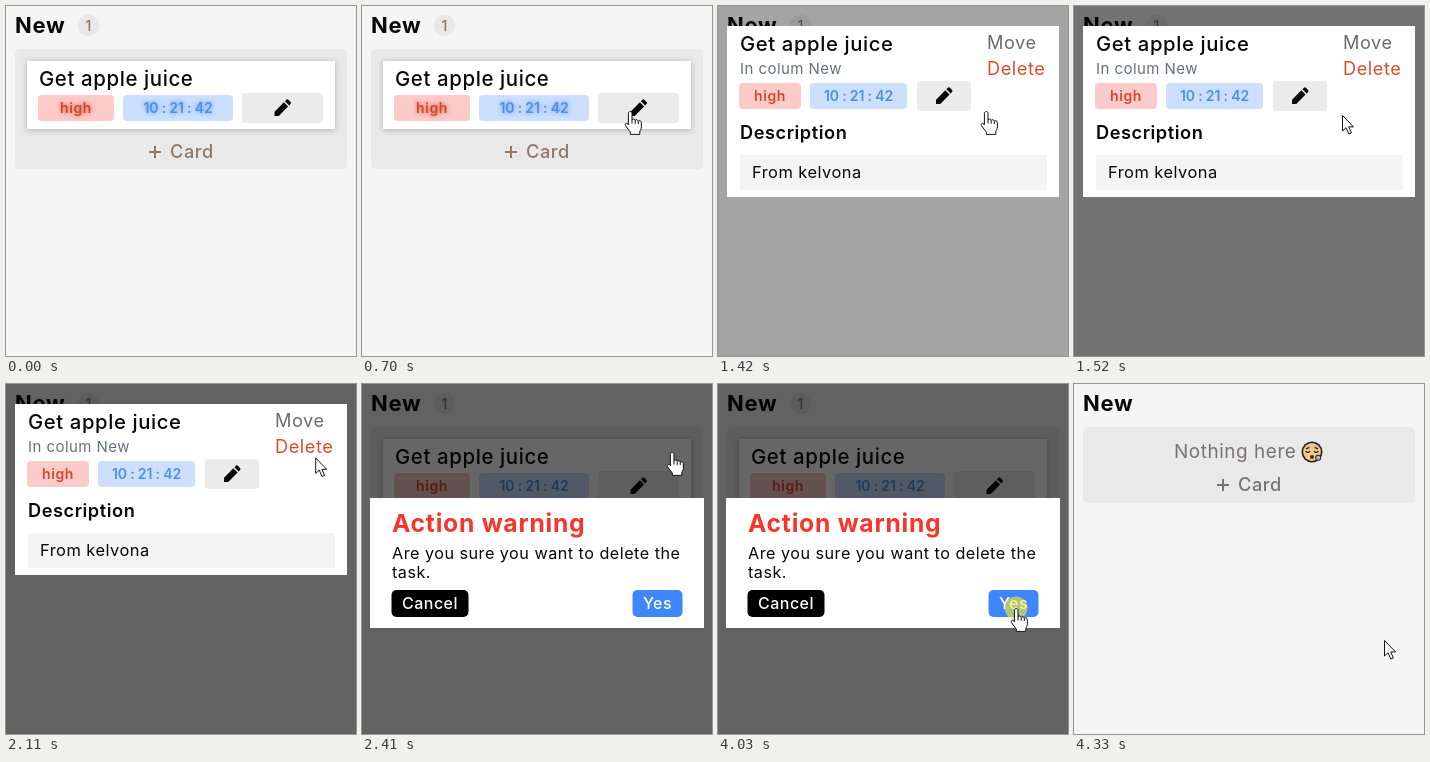
Recreate the animation shown at these times as an HTML page with a canvas. Size 350x350 px, loop 4.43 s.

```html
<!DOCTYPE html>
<html lang="en">
<head>
<meta charset="utf-8">
<title>Task board</title>
<style>
html, body { margin: 0; width: 100%; height: 100%; overflow: hidden; background: #f5f5f5; }
canvas { display: block; width: 350px; height: 350px; }
</style>
</head>
<body>
<canvas id="stage"></canvas>
<script>
const LOOP = 4430;
const OPEN = 1320, ASK = 2410, CONFIRM = 4030, REMOVED = 4130;
const INK = '#080808';
const canvas = document.getElementById('stage');
const ratio = window.devicePixelRatio || 1;
canvas.width = canvas.height = Math.round(350 * ratio);
const ctx = canvas.getContext('2d');

const PENCIL = new Path2D('M3 16.2V21H7.8L18.4 10.4 13.6 5.6z' +
  'M14.8 4.4l1.6-1.6a1.6 1.6 0 0 1 2.3 0l2.5 2.5a1.6 1.6 0 0 1 0 2.3l-1.6 1.6z');
const ARROW = new Path2D('M.5 .5V16L4 12.7 6.8 19 9.4 18 6.7 11.9H11.5Z');
const HAND = new Path2D('M-1.6 13V2.2C-1.6 0 2 0 2 2.2V9C2.2 7.5 5 7.6 5.2 9.4' +
  'C5.6 8.2 8 8.4 8.3 10.3C8.9 9.3 11.4 9.6 11.4 11.6V16C11.4 18.2 9.8 19.4 9.8 21V23.4' +
  'H.4V21.2C-1 19.2-3 17-4.5 14.6C-5.4 12.6-3.4 11.4-2.3 12.8L-1.6 13.8Z');

// Each move ends on a spot and shows a hand there until its release time.
const ENTRY = { x: 246, y: 282 };
const MOVES = [
  { from: 200, steps: 6, x: 268, y: 105, release: 1520 },
  { from: 1620, steps: 3, x: 305, y: 77, release: 2610 },
  { from: 1910, steps: 4, x: 310, y: 68, release: 2610 },
  { from: 2610, steps: 7, x: 298, y: 224, release: REMOVED },
  { from: REMOVED, steps: 3, x: 310, y: 252, release: 0 }
];

const smooth = u => u * u * (3 - 2 * u);
const easeOut = u => 1 - (1 - u) ** 2;

// Progress from 0 to 1 that advances once every 100 ms.
function stepped(t, from, steps) {
  return Math.min(Math.max(Math.floor((t - from) / 100) + 1, 0), steps) / steps;
}

function box(x, y, w, h, color, r = 0) {
  ctx.fillStyle = color;
  ctx.beginPath();
  ctx.roundRect(x, y, w, h, r);
  ctx.fill();
}

function disc(x, y, r, color) {
  ctx.fillStyle = color;
  ctx.beginPath();
  ctx.arc(x, y, r, 0, 7);
  ctx.fill();
}

function text(str, x, y, size, weight, color, align = 'left', gap = .03) {
  ctx.font = `${weight} ${size}px Inter, "Open Sans", sans-serif`;
  ctx.letterSpacing = `${size * gap}px`;
  ctx.textAlign = align;
  ctx.fillStyle = color;
  ctx.fillText(str, x, y);
}

function shadow(color, blur, y, draw) {
  ctx.save();
  ctx.shadowColor = color;
  ctx.shadowBlur = blur * ratio;
  ctx.shadowOffsetY = y * ratio;
  draw();
  ctx.restore();
}

function chip(label, x, y, w, fill, color, glow, gap) {
  box(x, y, w, 26, fill, 4);
  shadow(color, glow, 0, () => text(label, x + w / 2, y + 18, 14, 600, color, 'center', gap));
}

function tags(x, y, highW, timeW, editW, space, glow) {
  chip('high', x, y, highW, '#fdcaca', '#cf4a2c', glow, .04);
  chip('10 : 21 : 42', x + highW + 9, y, timeW, '#cddfff', '#4c90e4', glow, -.01);
  const left = x + highW + timeW + 9 + space;
  box(left, y - 2, editW, 30, '#ebebeb', 4);
  ctx.save();
  ctx.translate(left + editW / 2 - 10.6, y + 2.4);
  ctx.scale(.88, .88);
  ctx.fillStyle = INK;
  ctx.fill(PENCIL);
  ctx.restore();
}

function addCard(y, color) {
  box(143, y - 1, 12, 2, color);
  box(148, y - 6, 2, 12, color);
  text('Card', 164, y + 6, 18.2, 500, color);
}

function sleepyFace(x, y) {
  ctx.save();
  ctx.translate(x, y);
  disc(0, 0, 10.5, '#25221e');
  disc(0, 0, 8.9, '#efc98a');
  ctx.strokeStyle = '#2b241d';
  ctx.lineWidth = 1.3;
  for (const side of [-1, 1]) {
    ctx.save();
    ctx.scale(side, 1);
    ctx.stroke(new Path2D('M2.6-4.6L6-3.2M2-.8Q4.2 1.4 6.4-.8'));
    ctx.restore();
  }
  disc(0, 5, 2, '#3a2c22');
  disc(6.2, 5.8, 3, '#2b241d');
  disc(6.2, 5.8, 2, '#a9c3d2');
  ctx.restore();
}

function board(empty, glow) {
  box(0, 0, 350, 350, '#f5f5f5');
  text('New', 9, 27, 22, 700, INK);
  box(9, 43, 332, empty ? 76 : 120, '#e9e9e9', 5);
  if (empty) {
    text('Nothing here', 100, 74, 18.9, 400, '#77736e');
    sleepyFace(238, 68);
    addCard(101, '#777371');
    return;
  }
  disc(82.5, 19.5, 10.7, '#e8e8e8');
  text('1', 82.5, 24.5, 14, 500, '#8f7061', 'center');
  shadow('rgba(0,0,0,.25)', 6, 1, () => box(21, 55, 308, 68, '#fff'));
  text('Get apple juice', 33, 80, 20.4, 500, INK);
  tags(32, 89, 76, 110, 81, 9, glow);
  addCard(146, '#927667');
}

function taskModal() {
  box(9, 20, 332, 171, '#fff');
  text('Get apple juice', 22, 45, 20.3, 550, INK);
  text('Move', 269, 43, 18.2, 400, '#676a70');
  text('Delete', 269, 69, 18.2, 400, '#d6502e');
  text('In colum New', 22, 68, 15, 400, '#66707a');
  tags(21, 77, 62, 97, 54, 10, 0);
  text('Description', 22, 133, 18.2, 600, INK);
  box(22, 149, 307, 35, '#f4f4f4');
  text('From kelvona', 34, 172, 16.4, 400, INK);
}

function button(label, x, w, color) {
  box(x, 206, w, 27, color, 5);
  text(label, x + w / 2, 225, 16, 500, '#fff', 'center');
}

function warning() {
  box(8, 114, 334, 130, '#fff');
  text('Action warning', 30, 147.5, 24.7, 700, '#f8352b');
  ['Are you sure you want to delete the', 'task.'].forEach((line, i) =>
    text(line, 30, 175 + i * 19, 16.2, 400, INK));
  button('Cancel', 29.5, 77, '#000');
  button('Yes', 270.5, 50, '#3d87fb');
}

function cursorAt(t) {
  let { x, y } = ENTRY, hand = false;
  for (const move of MOVES.filter(m => m.from <= t)) {
    const u = smooth(stepped(t, move.from, move.steps));
    x += (move.x - x) * u;
    y += (move.y - y) * u;
    hand = u > .9 && t < move.release;
  }
  return { x, y, hand };
}

function pointer(t, time) {
  const { x, y, hand } = cursorAt(t);
  const pressed = [OPEN, CONFIRM].some(at => time >= at && time < at + 100);
  if (pressed) disc(x, y, 11.5, 'rgba(250,236,50,.6)');
  ctx.save();
  ctx.translate(x, hand ? y : y + 4);
  ctx.lineJoin = 'round';
  ctx.fillStyle = '#fff';
  ctx.strokeStyle = '#111';
  const shape = hand ? HAND : ARROW;
  ctx.fill(shape);
  ctx.stroke(shape);
  if (hand) ctx.stroke(new Path2D('M2 9V12.5M5.2 9.4V12.8M8.3 10.3V13'));
  ctx.restore();
}

function draw(now) {
  const t = now % LOOP;
  const shade = .6 * (easeOut(stepped(t, OPEN + 100, 3)) - easeOut(stepped(t, REMOVED, 3)));
  ctx.setTransform(ratio, 0, 0, ratio, 0, 0);
  board(t >= REMOVED, t < OPEN ? 5 : 0);
  box(0, 0, 350, 350, `rgba(0,0,0,${shade})`);
  if (t >= OPEN && t < ASK) taskModal();
  if (t >= ASK && t < REMOVED) warning();
  if (t >= MOVES[0].from) pointer(t, t);
}

const start = performance.now();
function tick() {
  draw(performance.now() - start);
  requestAnimationFrame(tick);
}
tick();
</script>
</body>
</html>
```
